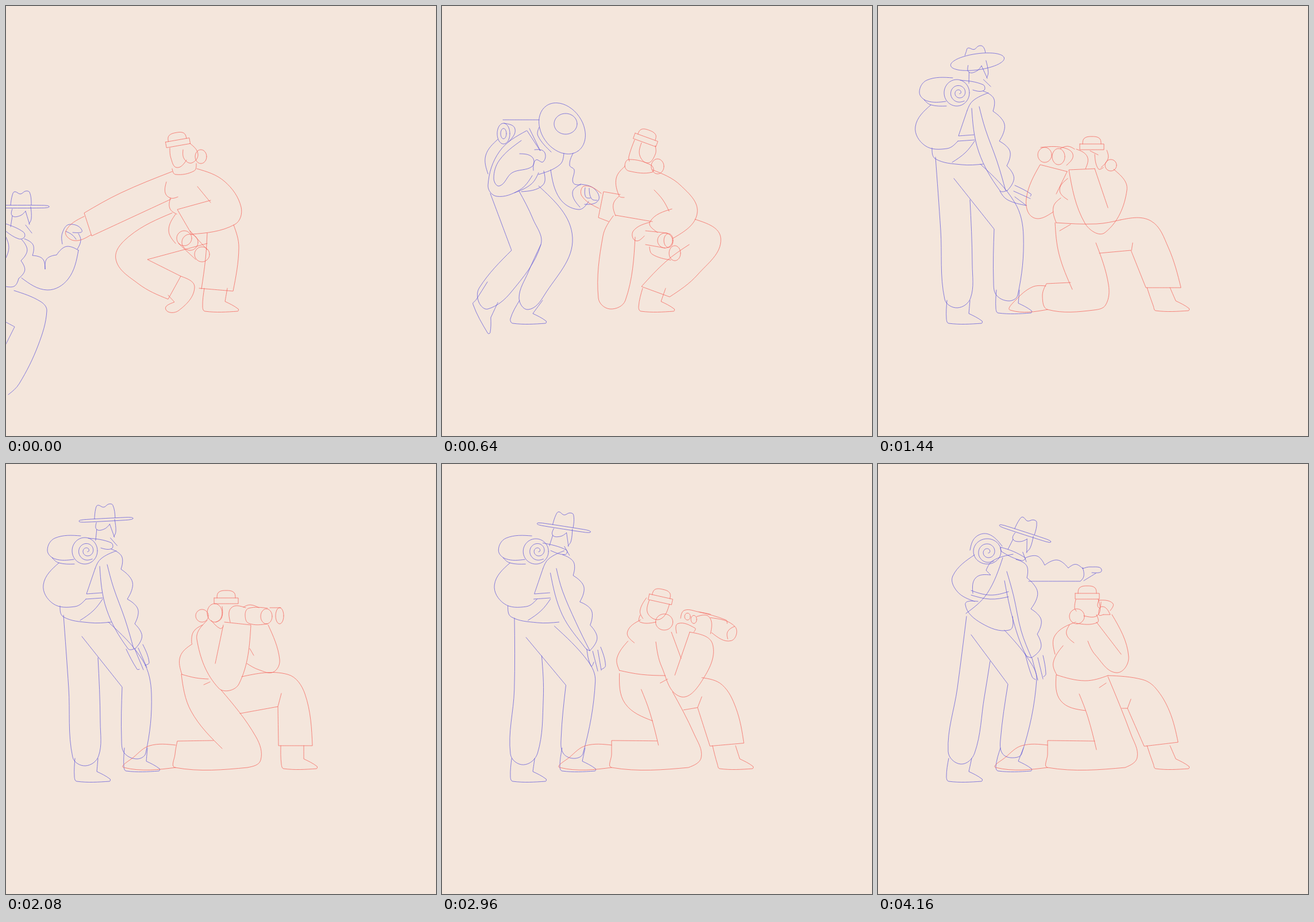
An HTML page that plays this animation: 748x748 px, repeating every 4.8 s.

```html
<!DOCTYPE html>
<html lang="en">
<head>
<meta charset="utf-8">
<title>Two hikers</title>
<style>
  html, body { margin: 0; width: 100%; height: 100%; overflow: hidden; background: #f4e6dc; }
  svg { display: block; width: 100%; height: 100%; }
  path { fill: none; stroke-width: .75; stroke-linecap: round; stroke-linejoin: round; }
</style>
</head>
<body>
<svg viewBox="0 0 748 748">
  <path id="walker" stroke="#5f57d9"/>
  <path id="watcher" stroke="#f4625a"/>
</svg>
<script>
const lerp = (a, b, k) => a + (b - a) * k;
const range = (n, fn) => Array.from({ length: n }, (_, i) => fn(i));
const power = (v, e) => Math.sign(v) * Math.abs(v) ** e;

function toPoints(text) {
  return text.replace(' z', '').split(' ').map(pair => {
    const [x, y] = pair.split(',').map(parseFloat);
    return { x, y, corner: pair.endsWith('!') };
  });
}

const curve = text => ({ points: toPoints(text), closed: text.endsWith('z') });

function place({ points, closed }, x, y, degrees) {
  const c = Math.cos(degrees * Math.PI / 180), s = Math.sin(degrees * Math.PI / 180);
  return { closed, points: points.map(p => ({ ...p, x: x + p.x * c - p.y * s, y: y + p.x * s + p.y * c })) };
}

function oval(x, y, rx, ry, turn = 0, roundness = 1) {
  const points = range(12, i => {
    const a = i * Math.PI / 6;
    return { x: rx * power(Math.cos(a), roundness), y: ry * power(Math.sin(a), roundness) };
  });
  return place({ points, closed: true }, x, y, turn);
}

const crown = curve('-20,-2 -17,-20 -13,-26 -3,-22 6,-27 13,-25 16,-2');
const face = ['-17,4 -17,16 -4,16 6,8', '-17,16 -20,35', '15,0 16,21 12,30', '6,8 13,31', '6,32 17,46'].map(curve);
const beanie = [curve('-16,-5 -13,-15 0,-18 13,-15 16,-5'), curve('-21,-5! 21,-5! 21,5! -21,5! z')];

// Compound strokes: each takes its numbers and returns a list of strokes.
const shapes = {
  oval: (...args) => [oval(...args)],
  spiral: (x, y, r) => [{ points: range(18, i => {
    const radius = r * (1 - i / 19), a = 1 + i * .75;
    return { x: x + radius * Math.cos(a), y: y + radius * Math.sin(a) };
  }) }],
  hat(x, y, turn, depth) {
    const top = { points: crown.points.map(p => ({ ...p, y: Math.min(p.y, -depth) })) };
    const rest = [top, ...face].map(stroke => place(stroke, x, y, turn));
    return [oval(x, y, 47, depth, turn, depth < 5 ? .5 : 1), ...rest];
  },
  beanie: (x, y, turn) => beanie.map(stroke => place(stroke, x, y, turn)),
  shoe: (x, y, lean, turn) => [place(curve(`${lean + 1},-40 0,-8 4,0 61,0 62,-4 39,-17! ${lean + 41},-40`), x, y, turn)],
  // Puffed sleeve: bulges between consecutive joints
  bumps(...xy) {
    const points = [];
    for (let i = 0; i + 3 < xy.length; i += 2) {
      const [x, y, nx, ny] = xy.slice(i, i + 4);
      points.push({ x, y, corner: true });
      for (const t of [.25, .5, .75]) {
        const h = .28 * Math.sin(Math.PI * t);
        points.push({ x: lerp(x, nx, t) + (ny - y) * h, y: lerp(y, ny, t) - (nx - x) * h });
      }
    }
    const [x, y] = xy.slice(-2);
    return [{ points: [...points, { x, y }] }];
  },
};

function parsePart(text) {
  return text.split(';').flatMap(item => {
    const call = item.match(/^([a-z]+) (.+)/);
    return call ? shapes[call[1]](...call[2].split(/[ ,]/).map(Number)) : curve(item);
  });
}

const shift = (text, dx, dy) => text.replace(/([\d.]+),([\d.]+)/g, (_, x, y) => `${+x + dx},${+y + dy}`);

// Strokes are split by ";". "!" marks a corner, "z" closes the stroke.
const walker = [];
walker[0] = {
  head: 'hat 28,349,0,2.5',
  collar: '0,379 30,393 32,402 22,405 0,392',
  torso: '0,402 5,420 0,438;bumps 27,406 26,443 22,474 0,488',
  reach: 'bumps 32,405 46,434 68,458 88,433 126,425;126,425 108,475 72,494 27,473',
  grip: '98,414 98,395 110,380 132,390 116,394;104,392 115,398 122,406;126,396 130,408 124,423',
  legs: '14,495 60,514 71,530 56,590 23,657 4,676;0,550 15,558! 0,588',
};
walker[1] = {
  head: 'oval 209,213,48,36,55;oval 215,205,20,18',
  collar: '169,211 167,226 190,254',
  pack: '169,198 106,198;oval 107,222,11,18;oval 107,222,5,9;108,204 127,214 115,237;97,232 76,260 80,292',
  torso: '148,217 171,252! 152,213;212,256 205,276 168,293;126,325 155,310 168,290;138,323 175,312 177,287',
  arm: '147,217 100,253 80,312 95,331 135,320 157,295;138,234 100,268 90,300 100,313 122,290 157,279 157,263 135,257;161,250 178,254 176,271 163,268 159,286',
  reach: '228,256 222,277 230,285 228,307 241,311;189,285 205,335 237,354 255,340;241,310 227,325 240,350',
  grip: '241,310 265,318 272,338 248,345;249,316 250,332 258,334;256,317 260,335 270,338',
  legs: '172,415 150,463 134,508 150,528 178,503 227,403 168,313;84,326 121,425! 65,490 64,515 80,527 120,498 172,415 158,370 134,322',
  shoes: 'shoe 119,552,15,0;shoe 52,515,-20,63',
};
walker[2] = {
  head: 'hat 173,97,-8,14',
  collar: '143,129 183,137 184,147 165,146',
  pack: '118,166 85,165 72,150 85,129 130,125;oval 137,151,22,23;spiral 141,151,17;92,172 65,210 82,243 120,248 139,235;80,163 92,172 119,174',
  torso: '155,182 140,226! 167,224;139,235 168,233;94,247 100,266 145,276 183,275;129,272 152,255 168,235;155,182 165,165 192,151',
  arm: 'bumps 183,148 200,183 211,235 224,278 225,321;176,175 187,215 207,270 222,321;163,178 175,253 212,321 225,321',
  hand: '212,322 225,337 258,347;238,312 266,327 265,331;236,322 265,335;238,332 258,347',
  legs: '100,263 109,390 116,510 138,525 161,508 164,450 160,337;132,300 202,388! 201,480 206,503 228,513 243,503 253,400 238,342 178,275',
  shoes: 'shoe 119,552,0,0;shoe 205,534,0,0',
};
walker[3] = {
  ...walker[2],
  head: 'hat 174,97,-3,2.5',
  hand: '209,322 228,357 232,357;238,314 249,345 242,350;224,322 239,358;230,320 245,354',
};
walker[4] = {
  head: 'hat 184,105,8,2.5',
  collar: shift(walker[2].collar, 5, 3),
  pack: walker[2].pack.split(';').map(s => s.startsWith('oval') ? 'oval 140,155,22,22' : shift(s, 3, 3)).join(';'),
  torso: shift(walker[2].torso, 5, 4),
  arm: 'bumps 188,152 206,191 221,231 244,269 250,316;181,178 191,215 221,264 250,316;166,180 190,253 245,313 250,316',
  hand: '249,316 253,338 257,323;268,308 279,340 270,348;258,317 266,349;266,314 270,348',
  legs: '106,270 117,395 117,508 140,524 165,503 170,410 158,327;135,305 208,386! 203,475 207,503 228,513 242,503 260,380 248,345 178,277',
  shoes: walker[2].shoes,
};
const turnedLegs = '154,265 138,390 122,500 144,522 168,503 185,405 195,343;162,297 226,383! 213,480 216,503 232,511 250,504 276,375 262,340 220,289';
walker[5] = {
  head: 'hat 251,119,10,2.5',
  collar: '214,145 256,163 250,168 216,153 z',
  pack: '160,150 170,127 192,122 216,143;oval 190,152,24,22;spiral 191,153,19;168,158 130,195 138,222 168,239',
  torso: '217,163 190,225 153,260;235,157 200,168 188,185! 196,193! 170,198 165,225;162,220 195,228 227,222;162,228 195,235 227,231;174,239 152,245 180,277 228,289 234,265',
  reach: 'bumps 257,163 290,176 331,181 356,182;356,180 358,195 352,204! 262,204;356,182 370,179 389,184 372,189;379,190 358,203',
  arm: 'bumps 240,166 259,198 266,252 277,296 267,337;224,187 236,230 249,290 267,337;220,203 236,275 257,332 267,337',
  hand: '256,330 268,370 274,375;287,333 292,365 288,370;268,338 278,376;278,337 287,374',
  legs: turnedLegs,
  shoes: 'shoe 119,552,3,0;shoe 205,534,7,0',
};
walker[6] = { ...walker[5], head: 'hat 256,121,18,2.5' };

const watcher = [];
const backFoot = ';295,528 205,528 222,510 250,490 295,489';
watcher[0] = {
  hat: 'beanie 299,238,-10',
  head: '285,247 287,265 297,281 314,268;308,250 310,266 323,273 334,258 320,239;oval 339,262,10,12;289,283 295,293 327,287 331,274',
  body: '279,306 277,325 286,334 299,332;286,334 285,352 297,362',
  arms: '289,288 200,325 136,360! 149,400! 287,336;332,283 380,305 409,350 398,380 323,397;333,314 356,342;356,338 298,354! 323,397',
  grip: '136,366 104,392 118,408 148,398',
  binoculars: '295,362 283,390 295,413;oval 310,404,13,13;oval 320,411,14,14;oval 341,432,13,13;300,413 330,441;320,391 350,424',
  legs: '289,360 215,400 191,440 230,483 282,510! 304,470! 246,441! 350,413;350,395 347,440 340,492;336,491 395,496! 405,420 396,381',
  shoes: 'shoe 342,531,2,0;282,503 293,515! 278,528 300,530 328,490 304,470',
};
watcher[1] = {
  hat: 'beanie 354,233,20',
  head: '335,233 325,262 326,270;347,238 344,260 358,273 371,258 371,243;318,278 325,267 364,277 366,289 325,287 z;oval 375,279,11,13',
  body: '318,279 303,300 308,330 317,333;308,331 298,345 302,365;302,364 366,375',
  arms: '310,328 281,323! 272,368! 290,375;366,285 415,312 444,360 402,404;369,320 384,337 395,357;400,353 362,375 375,394',
  grip: '277,326 248,313 243,330 273,352',
  binoculars: '362,376 333,391 336,408 352,400;oval 388,408,13,13;oval 394,408,8,12;oval 405,430,10,13;354,391 392,395;354,415 388,421;361,419 366,432 398,442',
  legs: '298,365 280,400 272,508 292,527 319,512 336,402;440,371 485,405 445,467 396,506! 347,488! 390,444 430,415',
  shoes: 'shoe 342,531,6,0',
};
watcher[2] = {
  hat: 'beanie 372,245,0',
  head: '398,251 400,266 388,281;377,258 383,283 392,281;oval 405,277,10,10;369,252 383,259',
  binoculars: 'oval 290,259,12,13;oval 314,262,11,14;283,246 320,246 339,258 328,277;317,248 330,244 342,249;345,249 364,262 361,283',
  body: '330,300 316,320 330,337;318,334 305,350 310,377;310,377 380,379 422,372;316,391 335,380',
  arms: '329,288 282,276! 258,335 270,368 305,358;329,288 310,327;377,283 332,285! 360,378 395,394 433,320 410,284;377,283 400,351',
  legs: '308,377 315,432 338,493;422,372 475,374 505,420 527,490! 466,490! 440,425! 385,430;443,412 441,425;379,412 401,485 396,520 375,529! 295,528 286,505 293,483! 335,481',
  shoes: 'shoe 479,530,-12,0;295,528 230,529 240,511 268,489 292,487',
};
watcher[3] = {
  hat: 'beanie 383,238,0',
  head: 'oval 363,259,13,16;oval 341,264,11,11;376,248 375,268 365,275;357,272 372,286 378,283',
  binoculars: 'oval 453,265,10,13;oval 476,264,7,14;455,251 422,251 416,262 422,277 455,278;459,250 478,250;413,249 425,245 440,250;390,275 392,250 417,250',
  body: '342,280 326,292 323,312;324,313 303,335 306,366;306,366 330,372 352,374;344,384 355,379',
  arms: '456,280 476,340 465,362 440,358 419,347;424,321 431,333;380,275 426,280! 405,383 370,390 332,305 350,272;378,280 364,347',
  legs: '305,366 322,430 376,495;410,370 490,366 520,400 533,490! 474,490! 473,422! 407,434;479,399 473,422;374,393 435,475 443,515 420,528! 294,528 294,505 298,482! 361,481',
  shoes: 'shoe 479,530,-2,0' + backFoot,
};
watcher[4] = {
  hat: 'beanie 380,234,0',
  head: '356,240 360,265 390,262 391,240;oval 341,258,14,11;399,240 399,258 393,266;355,265 386,285 383,268',
  binoculars: '421,246 430,241 485,241 497,262 490,274 440,275;430,247 490,247;485,241 484,258 486,273;400,248 412,243 422,250 z;410,262 424,254 428,275;421,246 438,258 441,275;392,290 391,270 410,266',
  body: '357,272 331,290 341,310;330,303 303,327 299,355;299,355 340,364 384,375;347,384 363,376',
  arms: '407,276 452,284 452,360 425,396 390,372 364,310;407,277 410,371;390,285 410,345',
  legs: '305,357 320,430 382,498;452,365 500,368 524,410 534,490! 475,490! 475,420! 409,436;486,393 475,420;367,386 435,470 451,510 425,528! 295,528 295,505 295,481! 366,481',
  shoes: watcher[3].shoes,
};
const kneelingLegs = '310,367 318,412 361,429;452,374 483,390 507,430 522,484! 463,491! 434,425! 424,425;440,409 434,425;413,400 440,470 451,510 430,528! 295,528 295,505 295,481! 377,482';
watcher[5] = {
  hat: 'beanie 380,236,17',
  head: '361,236 350,258 355,272;366,240 364,264 385,273 401,247;oval 392,278,15,14;350,266 350,278 378,278',
  binoculars: '418,273 425,259 450,262 470,266;oval 430,270,5,6;oval 441,275,5,7;450,262 497,276 499,282;470,272 513,288 506,312 472,298;512,287 500,296 500,309;446,270 468,271 470,300',
  body: '349,279 326,300 338,319;327,316 308,345 312,367;312,367 350,374 392,376;383,389 396,382;350,400 365,440 380,497',
  arms: '434,290 474,312 455,375 417,402 385,350 375,307;434,290 408,365;402,290 419,336;411,292 414,275 443,283 441,290',
  legs: kneelingLegs,
  shoes: 'shoe 479,530,-12,0' + backFoot,
};
watcher[6] = {
  hat: 'beanie 364,230,0',
  head: '344,236 342,250 345,256;oval 346,265,13,13;383,235 383,262 358,264;380,262 381,276 345,277',
  binoculars: '384,237 408,242 404,255;384,237 384,250 388,240',
  body: '344,275 308,298 308,331;333,280 328,296 341,311;322,316 305,345 311,367;311,367 360,377 400,368;385,389 397,381;350,400 365,440 380,497',
  arms: '392,262 384,262 390,248 404,262! 392,262;407,262 436,335 415,363 378,332 365,308;380,275 423,331',
  legs: kneelingLegs.replace('452,374', '400,368 460,375').replace('413,400', '400,370'),
  shoes: watcher[5].shoes,
};

const STEP = 80, LOOP = 4800;
const tracks = [
  { id: 'walker', poses: walker, keys: [[0, 0], [640, 1], [1200, 2], [1680, 2], [2080, 3], [2560, 3], [2640, 4], [3360, 5], [3680, 5], [4160, 6]] },
  { id: 'watcher', poses: watcher, keys: [[0, 0], [640, 1], [1440, 2], [2080, 3], [2240, 3], [2480, 4], [2640, 4], [3120, 5], [3680, 5], [4160, 6]] },
];

const parsePose = pose => Object.fromEntries(Object.entries(pose).map(([name, text]) => [name, parsePart(text)]));

function center(part) {
  const points = part.flatMap(stroke => stroke.points);
  const mean = axis => points.reduce((sum, p) => sum + p[axis], 0) / points.length;
  return { x: mean('x'), y: mean('y') };
}

const between = (p, q, k) => ({ x: lerp(p.x, q.x, k), y: lerp(p.y, q.y, k) });
const sameShape = (a, b) => a.length === b.length && a.every((s, i) => s.points.length === b[i].points.length);

// Matching parts morph; others slide along and switch halfway.
function blend(a, b, k) {
  const near = k < .5 ? a : b;
  if (!a || !b) return near || [];
  let move;
  if (sameShape(a, b)) {
    move = (p, i, j) => between(a[i].points[j], b[i].points[j], k);
  } else {
    const own = center(near), spot = between(center(a), center(b), k);
    move = p => ({ x: p.x + spot.x - own.x, y: p.y + spot.y - own.y });
  }
  return near.map((s, i) => ({ ...s, points: s.points.map((p, j) => ({ ...p, ...move(p, i, j) })) }));
}

// Smooth path through the points, straight between corners
function strokePath({ points, closed }) {
  const n = points.length, at = i => points[(i + n) % n];
  const sharp = i => at(i).corner || !closed && (i === 0 || i === n - 1);
  const handle = (i, length) => {
    const p = at(i), dx = at(i + 1).x - at(i - 1).x, dy = at(i + 1).y - at(i - 1).y;
    const scale = .35 * length / (Math.hypot(dx, dy) || 1);
    return { x: p.x + dx * scale, y: p.y + dy * scale };
  };
  let d = `M${at(0).x} ${at(0).y}`;
  for (let i = 0; i < (closed ? n : n - 1); i++) {
    const j = (i + 1) % n, p = at(i), q = at(j), length = Math.hypot(q.x - p.x, q.y - p.y);
    let c1 = sharp(i) ? p : handle(i, length), c2 = sharp(j) ? q : handle(j, -length);
    if (sharp(i)) c1 = between(p, c2, .5);
    else if (sharp(j)) c2 = between(q, c1, .5);
    d += `C${c1.x} ${c1.y} ${c2.x} ${c2.y} ${q.x} ${q.y}`;
  }
  return d;
}

function posePath({ poses, keys }, time) {
  const next = keys.findIndex(key => key[0] > time);
  const [t1, to] = keys.at(next), [t0, from] = next > 0 ? keys[next - 1] : keys.at(-1);
  const u = next > 0 ? (time - t0) / (t1 - t0) : 1;
  const a = poses[from], b = poses[to], names = new Set([...Object.keys(a), ...Object.keys(b)]);
  return [...names].flatMap(name => blend(a[name], b[name], u * u * (3 - 2 * u))).map(strokePath).join('');
}

for (const track of tracks) {
  track.poses = track.poses.map(parsePose);
  track.node = document.getElementById(track.id);
}

const start = performance.now();
function draw(now) {
  const time = Math.floor(Math.max(0, now - start) % LOOP / STEP) * STEP;
  for (const track of tracks) track.node.setAttribute('d', posePath(track, time));
  requestAnimationFrame(draw);
}
draw(start);
</script>
</body>
</html>
```
